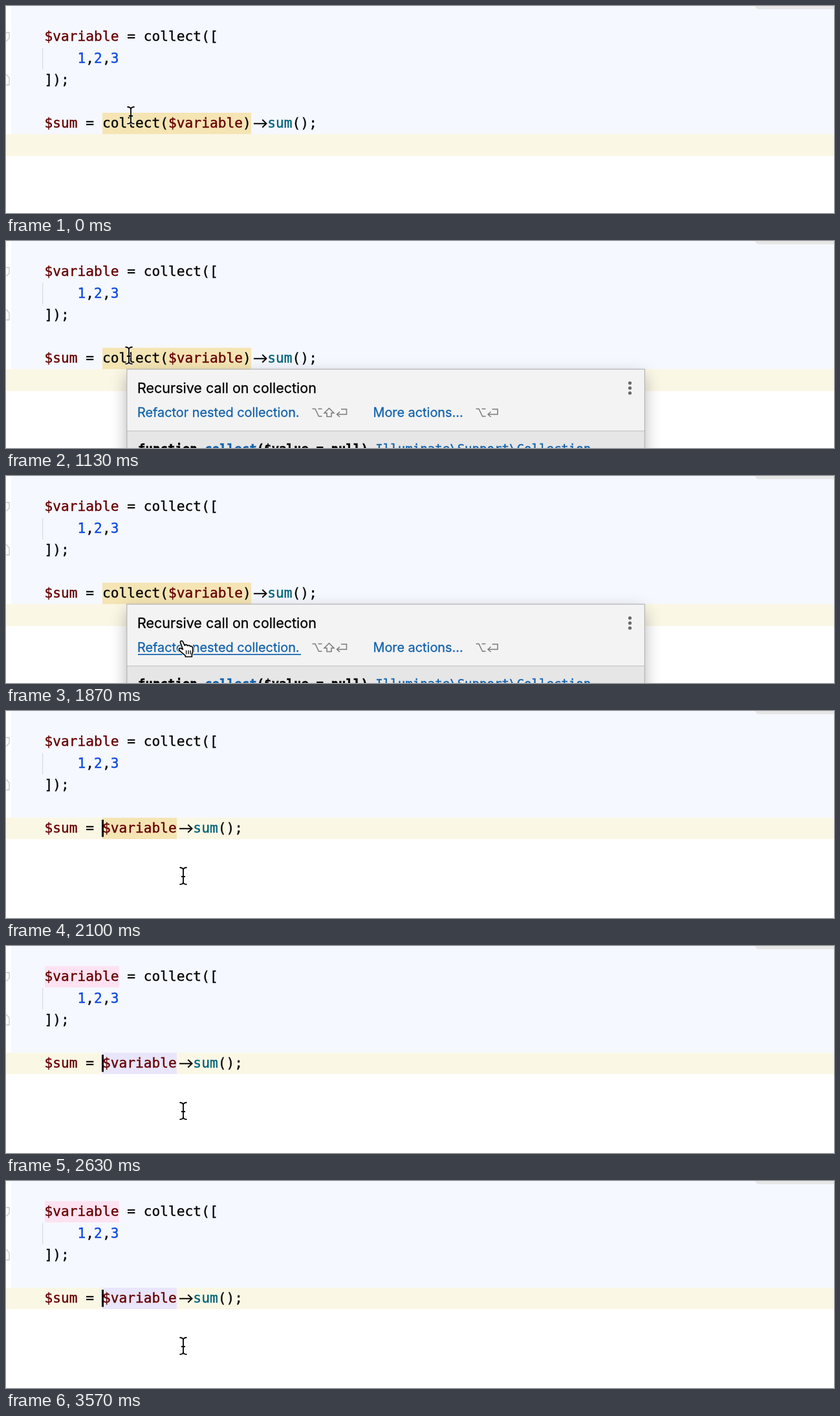
Animation of 1280x320 px, one loop 3.61 s. Source, as an HTML page with a canvas:

```html
<!DOCTYPE html>
<html lang="en">
<head>
<meta charset="utf-8">
<title>Nested collection refactoring</title>
<style>
  html, body { margin: 0; width: 100%; height: 100%; overflow: hidden; background: #fff; }
  canvas { display: block; }
</style>
</head>
<body>
<canvas id="stage" width="1280" height="320"></canvas>
<script>
const ctx = document.getElementById('stage').getContext('2d');
const LOOP = 3610;
const LEFT = 59.5, CELL = 12.77, TOP = 30.8, ROW = 33.45;
const MONO = '"DejaVu Sans Mono", monospace';
const SANS = 'Inter, sans-serif';
const INK = '#080808', VAR = '#660000', NUM = '#0f4be0', METHOD = '#00627a', LINK = '#1262ac', GREY = '#7b7b7b';

// Moments in ms
const POPUP = 900, CLICK = 2000, USAGES = 2400;

const rect = (x, y, w, h, color) => {
  ctx.fillStyle = color;
  ctx.fillRect(x, y, w, h);
};

function line(points, color, width = 1) {
  ctx.beginPath();
  points.forEach(([x, y]) => ctx.lineTo(x, y));
  ctx.strokeStyle = color;
  ctx.lineWidth = width;
  ctx.stroke();
}

// A hairline stroke gives the text its slightly heavier weight
function text(str, x, y, font, color, heft = 0.3) {
  ctx.font = font;
  ctx.fillStyle = ctx.strokeStyle = color;
  ctx.lineWidth = heft;
  ctx.fillText(str, x, y);
  ctx.strokeText(str, x, y);
}

// Monospaced text set on an exact grid
function grid(str, x, y, cell, font, color) {
  [...str].forEach((ch, i) => ch !== ' ' && text(ch, x + i * cell, y, font, color, 0.4));
}

const colX = col => LEFT + col * CELL;
const rowY = row => TOP + row * ROW;

function code(row, col, ...parts) {
  for (const [str, color] of parts) {
    if (str === '->') arrowSign(colX(col), rowY(row) + 17.2);
    else grid(str, colX(col), rowY(row) + 23.6, CELL, '21.2px ' + MONO, color);
    col += str.length;
  }
}

function arrowSign(x, y) {
  line([[x + 4.2, y], [x + 23.5, y]], INK, 2);
  line([[x + 17.5, y - 6], [x + 23.7, y], [x + 17.5, y + 6]], INK, 2);
}

function mark(row, col, length, color) {
  const y = Math.round(rowY(row));
  rect(Math.round(colX(col)), y, Math.round(length * CELL), 33, color);
}

function caret(x, row) {
  rect(x, rowY(row) + 3.5, 3, 26.5, '#000');
}

function editor(t) {
  const done = t >= CLICK;
  rect(0, 0, 1280, 320, '#fff');
  rect(8, 0, 1272, done ? 165 : 198, '#f5f8ff');
  rect(0, done ? 165 : 198, 1280, done ? 33 : 34, '#fbf7e5');

  ctx.beginPath();
  ctx.roundRect(1158, -10, 140, 15, 6);
  ctx.fillStyle = '#e6e6e6';
  ctx.fill();

  line([[-2, 41], [5, 41], [5, 50], [0, 54.5]], '#c6c8cb', 1.3);
  line([[0, 105.5], [5, 111], [5, 122], [-2, 122]], '#c6c8cb', 1.3);
  rect(56, 65, 1.3, 33, '#d9dce2');

  if (t >= USAGES) mark(0, 0, 9, '#fde3f1');
  if (!done) mark(4, 7, 18, '#f5e5b4');
  else mark(4, 7, 9, t < USAGES ? '#f5e5b4' : '#e9e5fa');

  code(0, 0, ['$variable', VAR], [' = collect([', INK]);
  code(1, 4, ['1', NUM], [',', INK], ['2', NUM], [',', INK], ['3', NUM]);
  code(2, 0, [']);', INK]);
  const arg = done
    ? [['$variable', VAR]]
    : [['collect(', INK], ['$variable', VAR], [')', INK]];
  code(4, 0, ['$sum', VAR], [' = ', INK], ...arg, ['->', INK], ['sum', METHOD], ['();', INK]);

  if (done) caret(148, 4);
  else if ((t + 700) % 1000 < 500 && t >= 300) caret(8, 5);
}

function optionKey(x) {
  line([[x, 259.5], [x + 4.5, 259.5], [x + 10, 271], [x + 15, 271]], GREY, 1.5);
  line([[x + 9, 259.5], [x + 15, 259.5]], GREY, 1.5);
}

function shiftKey(x) {
  line([[x + 8.5, 258.5], [x + 16, 266], [x + 12, 266], [x + 12, 271.5], [x + 5, 271.5],
    [x + 5, 266], [x + 1, 266], [x + 8.5, 258.5], [x + 16, 266]], GREY, 1.5);
}

function returnKey(x) {
  line([[x + 8, 260], [x + 16.5, 260], [x + 16.5, 268], [x + 2, 268]], GREY, 1.5);
  line([[x + 6, 264], [x + 1.5, 268], [x + 6, 272]], GREY, 1.5);
}

function popup(hover) {
  ctx.save();
  ctx.shadowColor = 'rgba(0,0,0,.3)';
  ctx.shadowBlur = 24;
  ctx.shadowOffsetY = 10;
  rect(187, 198, 800, 160, '#f3f3f3');
  ctx.restore();
  rect(187, 293, 800, 27, '#e6e6e6');
  rect(187, 293, 800, 1.2, '#c6c6c6');
  ctx.strokeStyle = '#b3b3b3';
  ctx.lineWidth = 1.2;
  ctx.strokeRect(186.8, 198.2, 800.6, 160);

  const small = '19.85px ' + SANS;
  text('Recursive call on collection', 203, 235.3, '21.5px ' + SANS, '#000');
  text('Refactor nested collection.', 203, 272.3, small, LINK);
  text('More actions...', 567.5, 272.3, small, LINK);
  if (hover) rect(204, 275, 252, 1.7, LINK);

  optionKey(473.5);
  shiftKey(491);
  returnKey(510);
  optionKey(726.5);
  returnKey(743.5);

  ctx.fillStyle = '#6a6a6a';
  for (const y of [219.5, 227.3, 235]) {
    ctx.beginPath();
    ctx.arc(964.5, y, 2.6, 0, 7);
    ctx.fill();
  }

  const doc = (str, col, color, weight = '') =>
    grid(str, 204 + col * 11.48, 328, 11.48, weight + '19px ' + MONO, color);
  doc('function', 0, '#000', 'bold ');
  doc('collect', 9, LINK, 'bold ');
  doc('($value = null)', 16, '#000', 'bold ');
  doc('Illuminate\\Support\\Collection', 32, LINK);
}

const BEAM = new Path2D('M-5.5-13C-2.5-13 0-12 0-9.5V9.5C0 12-2.5 13-5.5 13M5.5-13C2.5-13 0-12 0-9.5M0 9.5C0 12 2.5 13 5.5 13M-3 1H3');
const ARROW = new Path2D('M0 0V19L4.5 15L7.5 22L10.5 20.7L7.5 14H13.5Z');
const HAND = new Path2D('M-4.4 2.6C-5.2 0-1.8-1.2-.6 1.2L2.2 7C3.2 5.4 5.8 5.6 6.6 7.4C8 6.2 10.2 6.8 10.8 8.4C12.6 7.6 14.2 8.6 14.5 10.6C15.1 14.5 15 17.4 13.4 20V24.5H3.4V22.6C.5 20.2-2.8 17.6-6 14.6C-7.8 12.4-5.6 10.4-3.4 11.6L-.6 13Z');
const KNUCKLES = new Path2D('M4.6 14.5V20.5M7.9 14.5V20.5M11.1 14.5V20.5');

function outlined(path, color, width) {
  ctx.strokeStyle = color;
  ctx.lineWidth = width;
  ctx.stroke(path);
}

function pointer(x, y, kind) {
  ctx.save();
  ctx.translate(x, y);
  ctx.lineJoin = 'round';
  if (kind === 'beam') {
    outlined(BEAM, 'rgba(255,255,255,.85)', 3.8);
    outlined(BEAM, '#000', 1.8);
  } else if (kind === 'arrow') {
    outlined(ARROW, '#fff', 3);
    ctx.fillStyle = '#000';
    ctx.fill(ARROW);
  } else {
    outlined(HAND, 'rgba(255,255,255,.8)', 4);
    ctx.fillStyle = '#fff';
    ctx.fill(HAND);
    outlined(HAND, '#000', 1.7);
    outlined(KNUCKLES, '#000', 1.3);
  }
  ctx.restore();
}

function ease(t, from, to) {
  const p = Math.min(1, Math.max(0, (t - from) / (to - from)));
  return p * p * (3 - 2 * p);
}

function draw(t) {
  const rest = ease(t, 30, 400), reach = ease(t, 1230, 1600);
  const x = 193 - 3 * rest + 84 * reach;
  const y = 169 + 8 * rest + 78 * reach;
  const open = t >= POPUP && t < CLICK;
  const hover = open && y > 251;
  editor(t);
  if (open) popup(hover);
  pointer(x, y, hover ? 'hand' : open && y > 198 ? 'arrow' : 'beam');
}

const start = performance.now();
function frame() {
  draw((performance.now() - start) % LOOP);
  requestAnimationFrame(frame);
}
frame();
</script>
</body>
</html>
```
